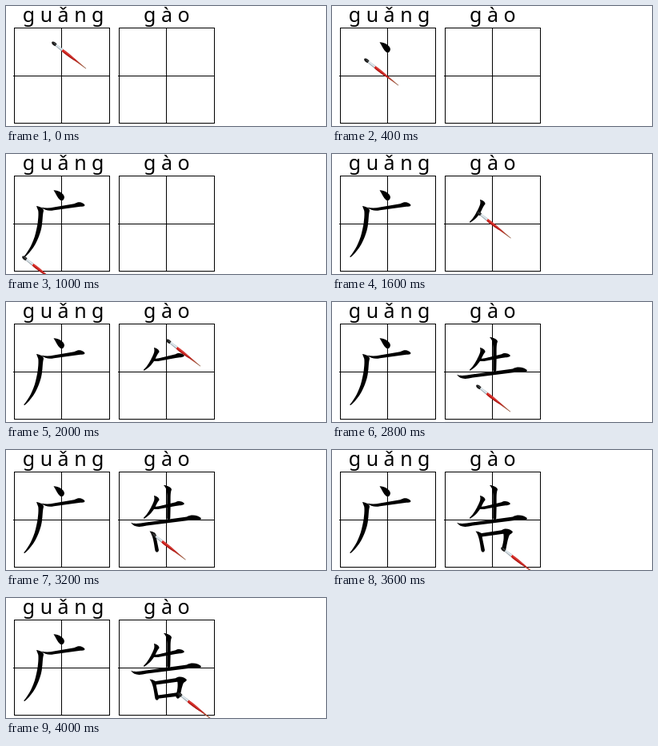
Recreate the animation shown at these times as an HTML page. Size 400x150 px, loop 4.2 s.

```html
<!DOCTYPE html>
<html lang="zh">
<head>
<meta charset="utf-8">
<title>guǎng gào</title>
<style>
html, body { margin: 0; width: 100%; height: 100%; overflow: hidden; background: #fff; }
svg { display: block; width: 400px; height: 150px; }
text { font: 25px "Noto Sans", "DejaVu Sans", sans-serif; }
.grid { fill: none; stroke: #000; stroke-width: 1; shape-rendering: crispEdges; }
</style>
</head>
<body>
<svg viewBox="0 0 400 150">
  <defs>
    <linearGradient id="handle" x1="0" y1="0" x2="1" y2="0">
      <stop offset="0" stop-color="#d3201b"/>
      <stop offset=".5" stop-color="#c01a17"/>
      <stop offset=".8" stop-color="#a8573f"/>
      <stop offset="1" stop-color="#8f6248"/>
    </linearGradient>
    <linearGradient id="metal" x1="0" y1="0" x2="0" y2="1">
      <stop offset="0" stop-color="#a9bac5"/>
      <stop offset=".4" stop-color="#eef5f8"/>
      <stop offset="1" stop-color="#7d8d97"/>
    </linearGradient>
    <path id="cell" class="grid" d="M.5 .5H119.5V119.5H.5ZM59.5 0V120M-1 60.5H120"/>
  </defs>
  <rect width="400" height="150" fill="#fff"/>
  <text x="20.8" y="20">g u ǎ n g</text>
  <text x="172" y="20">g à o</text>
  <use href="#cell" x="10" y="27"/>
  <use href="#cell" x="141" y="27"/>
  <g id="ink"></g>
  <g id="brush">
    <g transform="translate(1.5 2) rotate(38)">
      <path d="M0 -.6C1.5 -2.4 4 -2.6 6.5 -1.5V1.5C4 2.5 1.5 2 0 .8Z" fill="#1c1c1c"/>
      <path d="M2.5 -.6L6.5 -.3" stroke="#6c7472" stroke-width=".7"/>
      <path d="M6.5 -1.4L16.5 -1.7V1.7L6.5 1.4Z" fill="url(#metal)"/>
      <path d="M16.5 -1.6C22 -2 28 -1.7 36 -1.1L54 -.4V.4L36 1.1C28 1.7 22 2 16.5 1.6Z" fill="url(#handle)"/>
      <path d="M18 1.4C24 1.6 29 1.2 36 .8" fill="none" stroke="#8a1714" stroke-width=".6"/>
      <path d="M18 -.6C24 -.9 29 -.6 35 -.3" fill="none" stroke="#ea7068" stroke-width=".5"/>
    </g>
  </g>
</svg>
<script>
const STEP = 200;

// Each stroke: brush start [x, y], then the parts as [path, brush x, brush y].
const strokes = [
  [[56, 43],
    ["M59.5 45.2C65 45 72.5 49 73 54C72.5 58 70 59 67.5 57.5C64.5 55 62.5 50 59.5 45.2Z", 68, 55]],
  [[39, 64],
    ["M44 66.5C50 68 55 67.5 60 66.5L85 62.3L90 60.2C94 59.7 98 62 98.5 63.8C98.5 65.5 96 65.8 93 65.8L60 70.3C54 71.5 49 71 44 66.5Z", 93, 61]],
  [[38, 64],
    ["M38 65C42 65.5 47.5 67.5 47 71C45 78 46.5 88 42.5 99C38.5 112 31 123 23 129.3L22.3 128.3C28.5 121 34 111 37 99C40 88 41 76 40.3 71Z", 19, 126]],
  [[184, 58],
    ["M185 57C188 57.5 192 60 191.5 62.5C189 65 188 69 185 74C181 80 177 83 172.5 86L171.8 85C177 80 181 73 184 66C186 62 185.5 59.5 185 57Z", 170, 82]],
  [[179.5, 70],
    ["M181.5 70.5C188 72 194 69.5 212 65.3C215 63 221 64 223 67C222 69.5 216.5 69.2 212 70L190 74C186 74.5 183 73.5 181.5 70.5Z", 218, 63]],
  [[199, 45],
    ["M197 44C201 44 207 46.5 207 49.5C205.3 53 205.7 60 205.7 69L205.3 85C204.8 88.5 201.8 88.5 201.2 85L201.3 57C201.2 51 200.5 47.5 197 44Z", 199, 84]],
  [[155, 90],
    ["M156 90.8C161 93 168 91.5 175 90.5L226 83.5C232 80 240 81.5 244.2 85.5C243.5 88 238 87.3 230 87.8L176 94.5C166 97 160 96.5 156 90.8Z", 238, 83]],
  [[179, 102],
    ["M179.5 101.5C184 102 187 103.5 187.3 106C188 111 190 119 191 125C190.5 128.5 187 128.5 186.3 125C185 117 184 107 179.5 101.5Z", 180, 121]],
  [[180.5, 102],
    ["M184 104.5L212 100.3C216 97 223 98.5 226 102.3C225 105 221 106 220 107L214 104.8L187 108.5Z", 218, 101],
    ["M214 103L223 104C220 109 219 116 217.5 123.5C216 126.5 213 126.5 212.3 122.5C214 116 215.5 110 214 103Z", 210, 120]],
  [[185, 120],
    ["M187 122L212 118.5C217 117.5 220 119.5 219 122.3L190 125.7Z", 213, 116.5]]
];

const ink = document.getElementById("ink");
const brush = document.getElementById("brush");
const poses = [];
const parts = [];

for (const [start, ...pieces] of strokes) {
  poses.push(start);
  for (const [d, x, y] of pieces) {
    const el = document.createElementNS("http://www.w3.org/2000/svg", "path");
    el.setAttribute("d", d);
    ink.append(el);
    parts.push({ el, from: poses.length });
    poses.push([x, y]);
  }
}

function draw(ms) {
  const step = Math.floor(ms / STEP) % poses.length;
  brush.setAttribute("transform", `translate(${poses[step]})`);
  for (const { el, from } of parts) {
    el.setAttribute("visibility", step >= from ? "visible" : "hidden");
  }
}

const began = performance.now();
function tick() {
  draw(performance.now() - began);
  requestAnimationFrame(tick);
}
tick();
</script>
</body>
</html>
```
